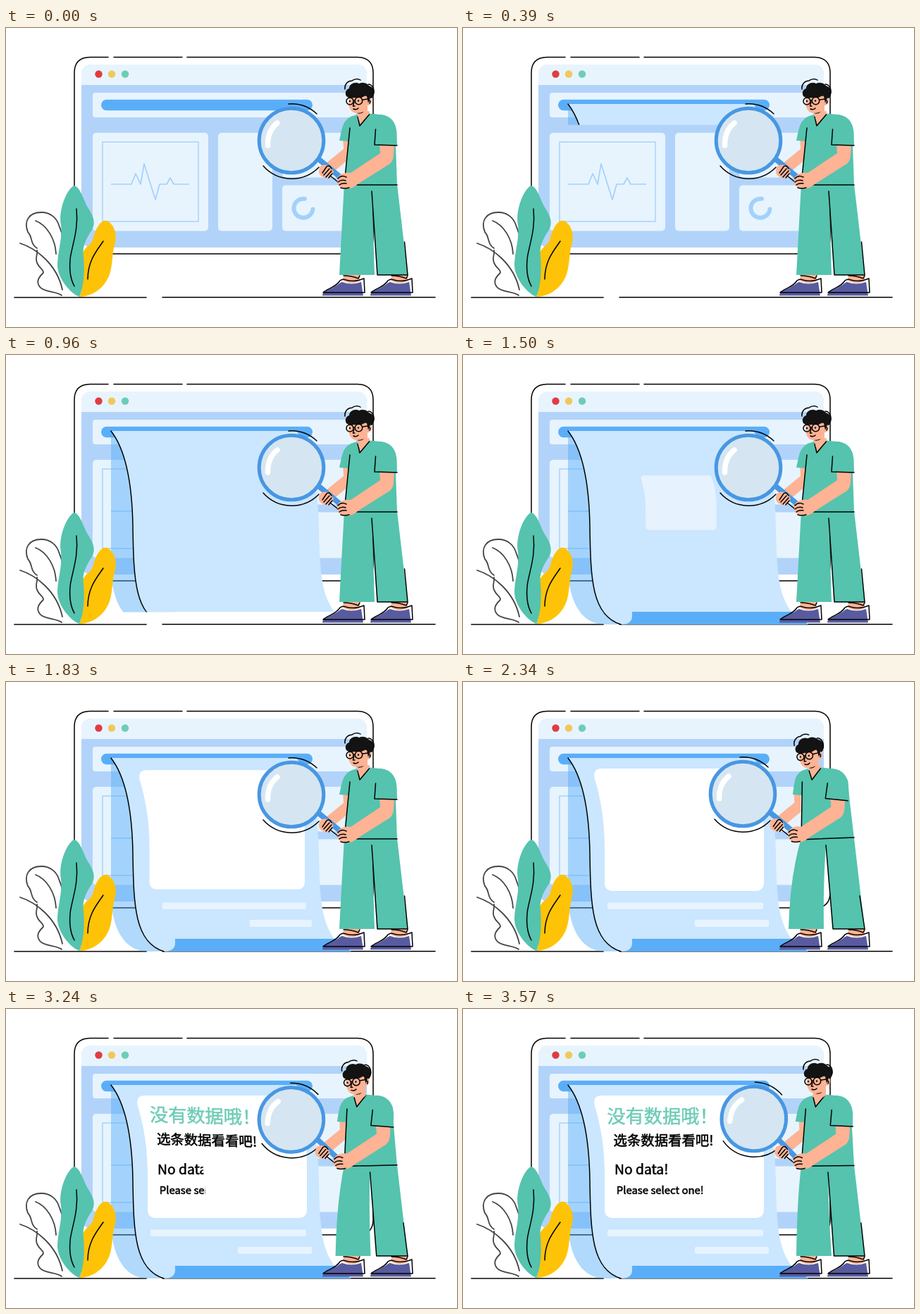
Recreate the animation shown at these times as an HTML page. Size 640 by 425 pixels, loop 4500 ms.

```html
<!DOCTYPE html>
<html lang="zh-CN">
<head>
<meta charset="utf-8">
<title>No data</title>
<style>
html, body { margin: 0; width: 100%; height: 100%; overflow: hidden; background: #fff; }
svg { display: block; width: 100vw; height: 100vh; }
.ln { fill: none; stroke: #000; stroke-width: 1.5; stroke-linecap: round; stroke-linejoin: round; }
.gray { fill: none; stroke: #444; stroke-width: 1.8; stroke-linecap: round; }
.pale { fill: #e7f4fe; }
.sky { fill: none; stroke: #a3d1fc; }
.teal { fill: #55c3ae; }
.skin { fill: #fdb394; }
.shoe { fill: #585b9f; }
.hair { fill: #131313; }
text { font-family: "Noto Sans CJK SC", "Noto Sans CJK", "Noto Sans", sans-serif; stroke: #000; stroke-width: .55; }
text.title { fill: #6fccb7; stroke: #6fccb7; }
</style>
</head>
<body>
<svg viewBox="0 0 640 425">
  <defs>
    <clipPath id="paperClip"><rect id="wipe" x="140" y="107" width="360" height="0"/></clipPath>
    <clipPath id="textClip"><path id="textWipe" d=""/></clipPath>
    <g id="foot">
      <path class="skin" d="M481 350H502L502 360Q488 366 477 358Z"/>
      <path class="ln" d="M479 352Q490 352 500 356L502 352"/>
      <path class="shoe" d="M449 380.500C449 375 455 373 462 370C469 367 472 363 477 361Q490 366 504 361L507 380.500Z"/>
      <path class="ln" d="M450 376C456 370 468 369 474 359Q478 356 482 358Q494 362 508 356L509 376Z"/>
    </g>
  </defs>

  <!-- browser window -->
  <path class="ln" d="M153 41.600H250M257 41.600H499Q521 42 521 64V299Q521 321 499 321H119Q97 321 97 299V64Q97 42 119 41.600H145"/>
  <rect x="107" y="52" width="405" height="260" rx="14" fill="#b2d3f9"/>
  <path class="pale" d="M107 81V66Q107 52 121 52H498Q512 52 512 66V81Z"/>
  <circle cx="131.500" cy="65.500" r="5.200" fill="#e03c41"/>
  <circle cx="150" cy="65.500" r="5.200" fill="#f3c75b"/>
  <circle cx="169" cy="65.500" r="5.200" fill="#6fccb7"/>
  <g class="pale">
    <rect x="123" y="92" width="374" height="35" rx="4"/>
    <rect x="123" y="149" width="164" height="139.500" rx="5"/>
    <rect x="301" y="149" width="77" height="139.500" rx="5"/>
    <rect x="392" y="149" width="105" height="63.500" rx="5"/>
    <rect x="392" y="223.500" width="105" height="65" rx="5"/>
  </g>
  <rect x="135" y="101.700" width="300" height="15.500" rx="7.700" fill="#5aaef8"/>
  <rect class="sky" x="137" y="162" width="136" height="113" stroke-width="1.400"/>
  <path class="sky" stroke-width="1.700" stroke-linejoin="round" d="M149 222H178L184 207L191 222L196 193L212 244L218 222H228L233 213L238 222H260"/>
  <path class="sky" stroke-width="6" stroke-linecap="round" d="M424 242.800A13.500 13.500 0 1 0 435.400 257.500"/>

  <!-- ground -->
  <path class="gray" d="M12 383H199"/>
  <path class="ln" d="M222 382.700H609"/>

  <!-- paper -->
  <path id="strip" fill="#5aaef8"/>
  <g clip-path="url(#paperClip)">
    <path fill="#50aaf8" fill-opacity=".45" d="M149 108V300C149 345 165 382 200 383H224C190 375 181 320 180 243C179 185 170 135 149 108Z"/>
    <path fill="#cbe6ff" d="M149 108C170 135 179 185 180 243C181 320 183 370 224 383Q240 383 240 371V365H466C450 342 445 320 444 243C443 185 433 135 412 108Z"/>
    <path class="ln" d="M149 108C170 135 179 185 180 243C181 320 183 370 224 383"/>
  </g>
  <g id="panel">
    <path fill="#fff" d="M197 123H402Q409 123 412 131C422 160 427 185 427 220V285Q427 297 415 297H213Q201 297 201 285V235C201 195 195 165 187 138Q183 123 197 123Z"/>
  </g>
  <rect id="bar1" class="pale" y="313.500" height="9.500" rx="2"/>
  <rect id="bar2" class="pale" y="338" height="10" rx="2"/>
  <g id="words">
    <g id="zh">
      <text class="title" x="204.500" y="161.500" font-size="26.200">没有数据哦！</text>
      <text x="213.500" y="193.500" font-size="19.400">选条数据看看吧!</text>
    </g>
    <g clip-path="url(#textClip)">
      <text x="215" y="234.500" font-size="19.300">No data!</text>
      <text x="217.800" y="263" font-size="14.900">Please select one!</text>
    </g>
  </g>

  <!-- plants -->
  <path class="gray" d="M79 380C72 374 54 376 48 368C42 360 47 354 52 349C57 344 42 340 43 328C43 323 45 320 44 316M44 313C34 307 38 297 31 290C25 275 32 262 50 262C64 262 72 271 75 280C77 287 80 290 80 298M42 274C58 280 70 300 71 321M20 306C42 313 72 335 80 372"/>
  <path fill="#fec307" d="M104 382C112 370 104 345 108 322C113 308 121 311 124 298C128 282 136 272 143 274C152 278 158 290 155 305C150 320 152 335 147 350C140 370 122 382 104 382Z"/>
  <path class="teal" d="M96 224C105 225 109 242 116 255C123 266 128 275 122 287C113 300 108 312 110 325C112 345 110 370 104 382C92 378 72 355 73 335C74 315 80 300 78 280C74 262 84 232 96 224Z"/>
  <path class="ln" d="M138 303C130 315 116 330 116 357M100 257C103 285 95 305 91.500 325C89 345 92 358 97 367"/>

  <!-- person -->
  <use href="#foot"/>
  <use href="#foot" x="68"/>
  <path id="legL" class="teal"/>
  <path id="legR" class="teal"/>
  <path id="legLine" class="ln"/>
  <path id="armL" class="skin" d="M478 154L479 172L452 194L463 206L488 185V154Z"/>
  <g id="shirt">
    <path class="skin" d="M498 120L516 118V126L502 140Z"/>
    <path class="teal" d="M498 123L489 126Q479 131 476 146L473 160L486 161L480 223H555L553 166V140Q546 124 530 123L516 121.500L502 139Z"/>
    <path class="ln" d="M488 142L480 223M499 126L502 139L515.500 123"/>
  </g>
  <path id="belt" class="ln"/>
  <g id="head">
    <path class="skin" d="M486 95L486.500 110C488 117 492 121 498 121L501 131L513 124L513 110C519 110 521 102 517 98L510 94Z"/>
    <path class="hair" d="M498 121Q504 123 508 119Q503 121 498 121Z"/>
    <path class="hair" d="M483 97C480 92 483 87 487 86C487 79 496 76 501 79C507 76 513 79 515 82C522 84 524 91 521 97C520 100 518 101 517 99L514 107L512 97C509 95 507 99 503 99C500 97 497 100 494 99Q488 101 483 97Z"/>
    <path class="ln" d="M481 87C480 79 486 75 491 75C494 72 500 72 503 74M514 80C520 80 524 88 521 95"/>
    <g class="ln">
      <circle cx="488" cy="104" r="5"/>
      <circle cx="500.500" cy="103.500" r="5.200"/>
      <path d="M493 103H495M506 102L513 101M494 105L492.500 111H495M493 115Q497 117 500 114M515 103Q518 103 516 107"/>
    </g>
    <circle cx="488" cy="104" r="1.200"/>
    <circle cx="500" cy="103.500" r="1.200"/>
  </g>
  <g id="lens">
    <path d="M442 185L478 215" stroke="#4897e3" stroke-width="7.500"/>
    <circle cx="405" cy="160" r="45.800" fill="#d5e6f2" stroke="#4897e3" stroke-width="5"/>
    <path d="M371.500 167Q371 146 385 135" fill="none" stroke="#fff" stroke-width="7.500" stroke-linecap="round"/>
    <path class="ln" d="M401 108A53 53 0 0 1 441 122M365 196A54 54 0 0 0 444 198"/>
  </g>
  <g id="arms">
    <path class="skin" d="M445 199C446 194 455 193 460 197L465 204C462 212 455 215 450 212C444 210 443 204 445 199Z"/>
    <path class="ln" d="M449 206L455 197Q459 194 462 200M451 209L459 200M454 212L462 203M458 213L463 207M460 210L470 218"/>
    <path class="skin" d="M530 164L551 165L550 182Q549 192 540 196L499 222C492 229 482 230 476 227C470 224 469 217 471 212C475 206 483 205 489 206L531 178Z"/>
    <path class="ln" d="M471 214Q476 208 483 212M471 219Q476 215 482 217M473 223Q477 220 483 221M475 227Q480 229 487 227"/>
    <g id="sleeve">
      <path class="teal" d="M518 130L530 123Q552 124 554.500 148L555 167L523 166Z"/>
      <path class="ln" d="M524.500 144L523 166L555 167"/>
    </g>
  </g>
</svg>
<script>
const LOOP = 4500, STEP = 30;
const $ = id => document.getElementById(id);
const set = (id, attrs) => { for (const k in attrs) $(id).setAttribute(k, attrs[k]); };
const part = (t, a, b) => Math.min(1, Math.max(0, (t - a) / (b - a)));
const out = (u, p) => 1 - (1 - u) ** p;
const inOut = u => (1 - Math.cos(Math.PI * u)) / 2;
const mix = (a, b, u) => a + (b - a) * u;

// values at rest, leaning in, and looking at the text
const poses = {
  lean: [0, 1, 0.25], hem: [0, 11, 0],
  headX: [0, -7.5, 2], headY: [0, 0.5, -1], nod: [0, -6, 0],
  armX: [0, -8.7, -1.7], armY: [0, -0.5, -0.5],
  lensX: [0, -8, 2.7], lensY: [0, -1, 1.2], turn: [0, 0, 6]
};

// damped wobble: angle at each ninth of the run
const jello = [0, 0, -12.5, 6.25, -3.125, 1.5625, -0.78, 0.39, -0.195, 0];
function wobble(u) {
  const i = Math.min(8, Math.floor(u * 9));
  return mix(jello[i], jello[i + 1], u * 9 - i);
}

function drawPaper(t) {
  const y = t <= 540
    ? 67 * part(t, 0, 540) ** 2.5
    : 67 + 211 * out(part(t, 540, 1080), 1.55);
  set('wipe', { height: t ? y + 1 : 0 });
  const top = 383 - 18.3 * out(part(t, 990, 1170), 2);
  set('strip', { d: `M226 383L240 ${top}H466L490 383Z` });
}

function drawPanel(t) {
  const u = part(t, 1470, 2010), s = mix(0.34, 1, out(u, 3));
  set('panel', {
    transform: `translate(306 210) scale(${s}) translate(-306 -210)`,
    opacity: u > 0 ? Math.min(1, 0.42 + u * 1.8) : 0
  });
  const off = 450 * (1 - u) ** 3;
  const bar = (id, x, right) => {
    const left = Math.min(right, x + off);
    set(id, { x: left, width: right - left });
  };
  bar('bar1', 205, 426);
  bar('bar2', 329, 434);
}

function drawWords(t) {
  $('words').style.display = t >= 3030 ? '' : 'none';
  const a = wobble(part(t, 3030, 3570));
  set('zh', { transform: `translate(280 168) skewX(${a}) skewY(${a}) translate(-280 -168)` });
  const x = mix(214, 352, part(t, 3000, 3500));
  set('textWipe', { d: `M200 210H${x - 2}L${x + 4} 275H200Z` });
}

function drawPerson(t) {
  const u = inOut(part(t, 1830, 2340)), v = out(part(t, 3000, 3540), 1.2);
  const p = {};
  for (const k in poses) {
    const [a, b, c] = poses[k];
    p[k] = mix(mix(a, b, u), c, v);
  }
  const L = p.lean, c = 0.0825 * L, crotch = 519 - 4 * L, inner = 527 - 2 * L;
  set('legL', { d: `M480 222H530L${crotch} 232Q${521 - 10 * L} 285 ${523 - p.hem} 351H${473 - p.hem}Q${477 - 13 * L} 275 480 222Z` });
  set('legR', { d: `M${crotch - 6} 222H555L570 351H${inner}L${crotch} 232Z` });
  set('legLine', { d: `M${crotch} 232L${inner} 351H570L${565.5 - 2.5 * L} 304` });
  set('belt', { d: `M${480 - L} ${223 + L}L555 ${223 - 2 * L}` });
  set('shirt', { transform: `matrix(1 0 ${c} 1 ${-222 * c} 0)` });
  set('head', { transform: `translate(${p.headX} ${p.headY}) rotate(${p.nod} 506 120)` });
  const arm = `translate(${p.armX} ${p.armY})`;
  set('armL', { transform: arm });
  set('arms', { transform: arm });
  set('sleeve', { transform: `rotate(${4 * L} 523 166)` });
  set('lens', { transform: `translate(${p.lensX} ${p.lensY}) rotate(${p.turn} 457 206)` });
}

const start = performance.now();
function frame(now) {
  const t = Math.floor((Math.max(0, now - start) % LOOP) / STEP) * STEP;
  drawPaper(t);
  drawPanel(t);
  drawWords(t);
  drawPerson(t);
  requestAnimationFrame(frame);
}
frame(start);
</script>
</body>
</html>
```
